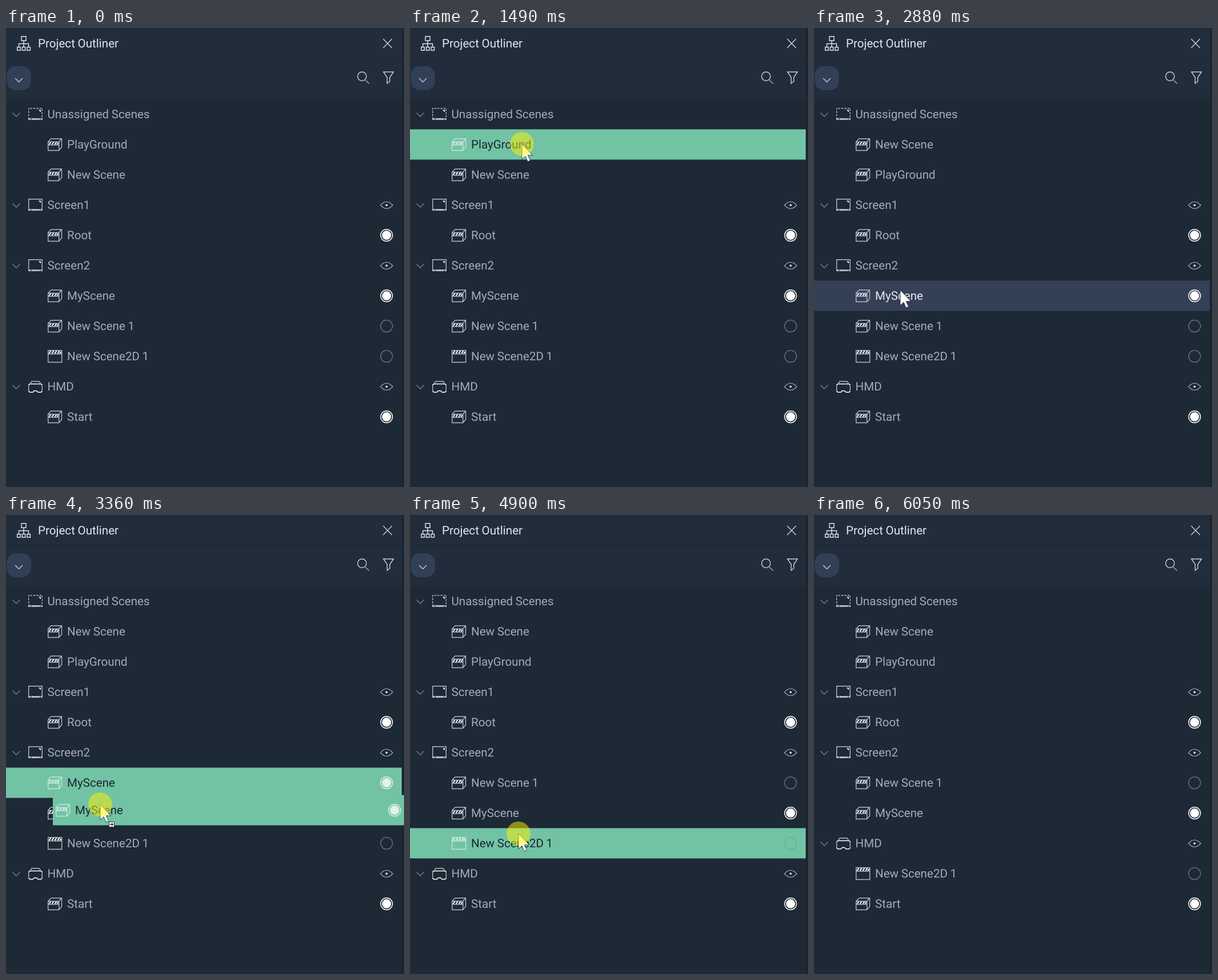
Animation, 697 px wide and 804 px high, one loop 6.23 s. Source, as an HTML page:

```html
<!DOCTYPE html>
<html lang="en">
<head>
<meta charset="utf-8">
<title>Project Outliner</title>
<style>
  html, body { margin: 0; width: 100%; height: 100%; overflow: hidden; background: #1e2936; }
  svg { display: block; width: 100vw; height: 100vh; }
  text { font: 20.6px Roboto, sans-serif; word-spacing: -.5px; fill: #a3acb9; text-rendering: geometricPrecision; }
  .line { fill: none; stroke: currentColor; stroke-width: 1.4; }
  .bright { fill: none; stroke: var(--hi); stroke-width: 1.4; }
  .row { color: #b3bbc5; --hi: #fff; --off: #687382; }
  .hover text { fill: #e5e8ed; }
  .held { color: #c5e6da; --hi: #e2f2ec; --off: #65b094; }
  .held text { fill: #1c2732; }
</style>
</head>
<body>
<svg viewBox="0 0 697 804">
  <defs>
    <pattern id="slats" width="5" height="6" patternUnits="userSpaceOnUse" x="74" y="21">
      <path d="M1 5.500 4 .500" stroke="var(--hi)" stroke-width="2.200"/>
    </pattern>
    <g id="chevron"><path class="line" d="M11.500 23.500 18 30l6.500-6.500" style="color:#758190"/></g>
    <g id="scene">
      <path class="line" d="M73.700 21.500h19v15h-19zM74 21l5-5h18.500v15L93 36M93 21l4.500-5M74 27h19"/>
      <path class="bright" d="m75.500 26 3-4m2 4 3-4m2 4 3-4m1 4 2-3" style="stroke-width:2"/>
    </g>
    <g id="flat">
      <path class="line" d="M73.700 15.700h24v20.800h-24zM74 22h24"/>
      <path class="bright" d="m75.500 21 3-4.500m2 4.500 3-4.500m2 4.500 3-4.500m2 4.500 3-4.500m1 4.500 2-3" style="stroke-width:2.200"/>
    </g>
    <g id="base">
      <path d="M39 34.500h25" stroke="currentColor" stroke-width="3"/>
      <path d="M43 34.600h2m14 0h2" stroke="#1e2936" stroke-width="1.200"/>
      <path d="M57 18.500h4v4z" fill="var(--hi)"/>
    </g>
    <g id="screen"><path class="line" d="M39.700 35V15.700h23.600V35"/><use href="#base"/></g>
    <g id="dashed"><path class="line" stroke-dasharray="3.500 2" d="M39.700 35V15.700h23.600V35"/><use href="#base"/></g>
    <g id="hmd">
      <path class="line" d="M42.500 20.500 45 17h13l2.500 3.500M39.700 25v7M63.300 25v7"/>
      <path class="bright" d="M39.700 24.500q0-3 3-3h17.600q3 0 3 3M39.700 32.500q0 3.500 3 3.500H47l2.500-2.500h4L56 36h4.300q3 0 3-3.500"/>
    </g>
    <g id="eye">
      <path class="line" d="M655.800 26.300q10.700-12 21.400 0-10.700 12-21.400 0z" style="stroke-width:1.100"/>
      <circle cx="666.500" cy="26.300" r="1.800" fill="var(--hi)"/>
    </g>
    <g id="on">
      <circle class="bright" cx="666.500" cy="26.100" r="10.400"/>
      <circle cx="666.500" cy="26.100" r="8" fill="var(--hi)"/>
    </g>
    <g id="off"><circle cx="666.500" cy="26.100" r="10.400" fill="none" stroke="var(--off)" stroke-width="1.300"/></g>
    <g id="arrow"><path d="M0 0v27l6-5.500 4.200 9.500 4.300-1.900-4.200-9.300h8.300z" fill="#fff" stroke="#1a222c" stroke-width=".8" stroke-linejoin="round"/></g>
    <g id="badge">
      <path d="M15.500 30.500h9v9h-9z" fill="#fff" stroke="#26313c"/>
      <path d="M17 35h5m-2-2.300 2.300 2.300-2.300 2.300" fill="none" stroke="#222c36" stroke-width="1.300"/>
    </g>
  </defs>

  <path fill="#1e2936" d="M0 0h697v804H0z"/>
  <path fill="#222d3c" d="M0 1h693v124H0z"/>
  <path fill="#1d2734" d="M0 0h697v1.500H0zM0 51h693v1.500H0z"/>
  <path fill="#1b2430" d="M693 0h4v804h-4z"/>

  <g class="line" style="color:#e3e6ea">
    <path d="M27 14.700h8v7.500h-8zM31 22v11M22.500 33v-5.500h17V33"/>
    <path d="M19.700 33.500h5.500V39h-5.500zM28.300 33.500h5.500V39h-5.500zM37 33.500h5.500V39H37z"/>
    <path d="m660.500 19 15.500 16m0-16-15.500 16" stroke="#cbd0d7"/>
    <circle cx="623.500" cy="84.700" r="7.700" stroke="#cbd0d7"/>
    <path d="m629.500 91.500 6.500 6" stroke="#a3acb7"/>
    <path d="M661 77h17.500l-6.300 9.500v7L667.500 97V86.500z" stroke="#cbd0d7"/>
  </g>
  <text x="56" y="34.300" style="fill:#e3e6ea">Project Outliner</text>
  <rect x="1.500" y="67" width="42.300" height="42" rx="16" fill="#314057"/>
  <path class="line" d="m16 88 6.500 6.500L29 88" style="color:#c3cad3"/>

  <g id="view"></g>
</svg>

<script>
const LOOP = 6230, TOP = 125, STEP = 53, ENTER = 240, LEAVE = 6050;
const view = document.getElementById('view');

const items = [
  ['Unassigned Scenes', 'dashed'],
  ['PlayGround', 'scene'],
  ['New Scene', 'scene'],
  ['Screen1', 'screen', 'eye'],
  ['Root', 'scene', 'on'],
  ['Screen2', 'screen', 'eye'],
  ['MyScene', 'scene', 'on'],
  ['New Scene 1', 'scene', 'off'],
  ['New Scene2D 1', 'flat', 'off'],
  ['HMD', 'hmd', 'eye'],
  ['Start', 'scene', 'on']
];

// The picture refreshes in even steps within each span: first, last, count
const spans = [[ENTER, 1100, 5], [1310, 2240, 6], [2390, 3360, 7], [3520, 4390, 6],
  [4580, 4900, 3], [5080, 5620, 4], [5840, LEAVE, 2]];
const ticks = [0, ...spans.flatMap(([a, b, n]) =>
  Array.from({ length: n }, (_, i) => 10 * Math.round((a + (b - a) * i / (n - 1)) / 10)))];

// Pointer stops: time, x, y
const stops = [
  [ENTER, 205, 516], [890, 198, 219], [1310, 196, 203], [2240, 191, 262],
  [2390, 190, 333], [2870, 151, 459], [3040, 151, 459], [3360, 165, 507],
  [4390, 179, 547], [4900, 190, 558], [5260, 199, 625], [5620, 189, 671]
];

// Each drop swaps the dragged row with the one below it
const drags = [
  { row: 1, press: 1310, drop: 2240 },
  { row: 6, press: 3040, drop: 4040 },
  { row: 8, press: 4900, drop: 5840 }
];

const easeOut = k => 1 - (1 - k) ** 2;
const use = (id, x = 0, y = 0) => `<use href="#${id}" x="${x}" y="${y}"/>`;
const bar = (x, y, w, fill) => `<rect x="${x}" y="${y - .5}" width="${w}" height="${STEP}" fill="${fill}"/>`;

function pointer(t) {
  t = Math.min(Math.max(t, ENTER), stops.at(-1)[0]);
  const i = Math.max(1, stops.findIndex(s => s[0] >= t));
  const [t0, x0, y0] = stops[i - 1], [t1, x1, y1] = stops[i];
  const k = easeOut((t - t0) / (t1 - t0));
  return { x: x0 + (x1 - x0) * k, y: y0 + (y1 - y0) * k };
}

function content([name, icon, mark], x, y, state) {
  const child = icon === 'scene' || icon === 'flat';
  return `<g class="row ${state}" transform="translate(${x} ${y})">` +
    (child ? '' : use('chevron')) + use(icon) + (mark ? use(mark) : '') +
    `<text x="${child ? 107 : 72.5}" y="33.4">${name}</text></g>`;
}

function draw(n) {
  const t = ticks[n], shown = t >= ENTER && t < LEAVE;
  const list = items.slice();
  for (const { row, drop } of drags)
    if (t >= drop) [list[row], list[row + 1]] = [list[row + 1], list[row]];

  const drag = drags.find(d => t >= d.press && t < d.drop);
  const at = pointer(t);
  // Hover trails the pointer by one refresh
  const hover = shown && !drag ? Math.floor((pointer(ticks[n - 1]).y - TOP) / STEP) : -1;

  let out = '';
  list.forEach((item, i) => {
    const state = drag && drag.row === i ? 'held' : hover === i ? 'hover' : '';
    const y = TOP + STEP * i;
    if (state) out += bar(0, y, 693, state === 'held' ? '#72c3a4' : '#344056');
    out += content(item, 0, y, state);
  });

  const moving = drag && t > drag.press;
  if (moving) {
    const from = pointer(drag.press);
    const dx = at.x - from.x, y = TOP + STEP * drag.row + at.y - from.y;
    out += bar(68 + dx, y, 625, '#72c3a4') + content(list[drag.row], dx, y, 'held');
  }
  if (shown) out += use('arrow', at.x, at.y);
  if (moving) out += use('badge', at.x, at.y);
  if (drag) out += `<circle cx="${at.x}" cy="${at.y}" r="21" fill="#fef400" fill-opacity=".5"/>`;
  view.innerHTML = out;
}

const start = performance.now();
let last = -1;
function tick() {
  const t = (performance.now() - start) % LOOP;
  const n = ticks.filter(s => s <= t).length - 1;
  if (n !== last) draw(last = n);
  requestAnimationFrame(tick);
}
tick();
</script>
</body>
</html>
```
